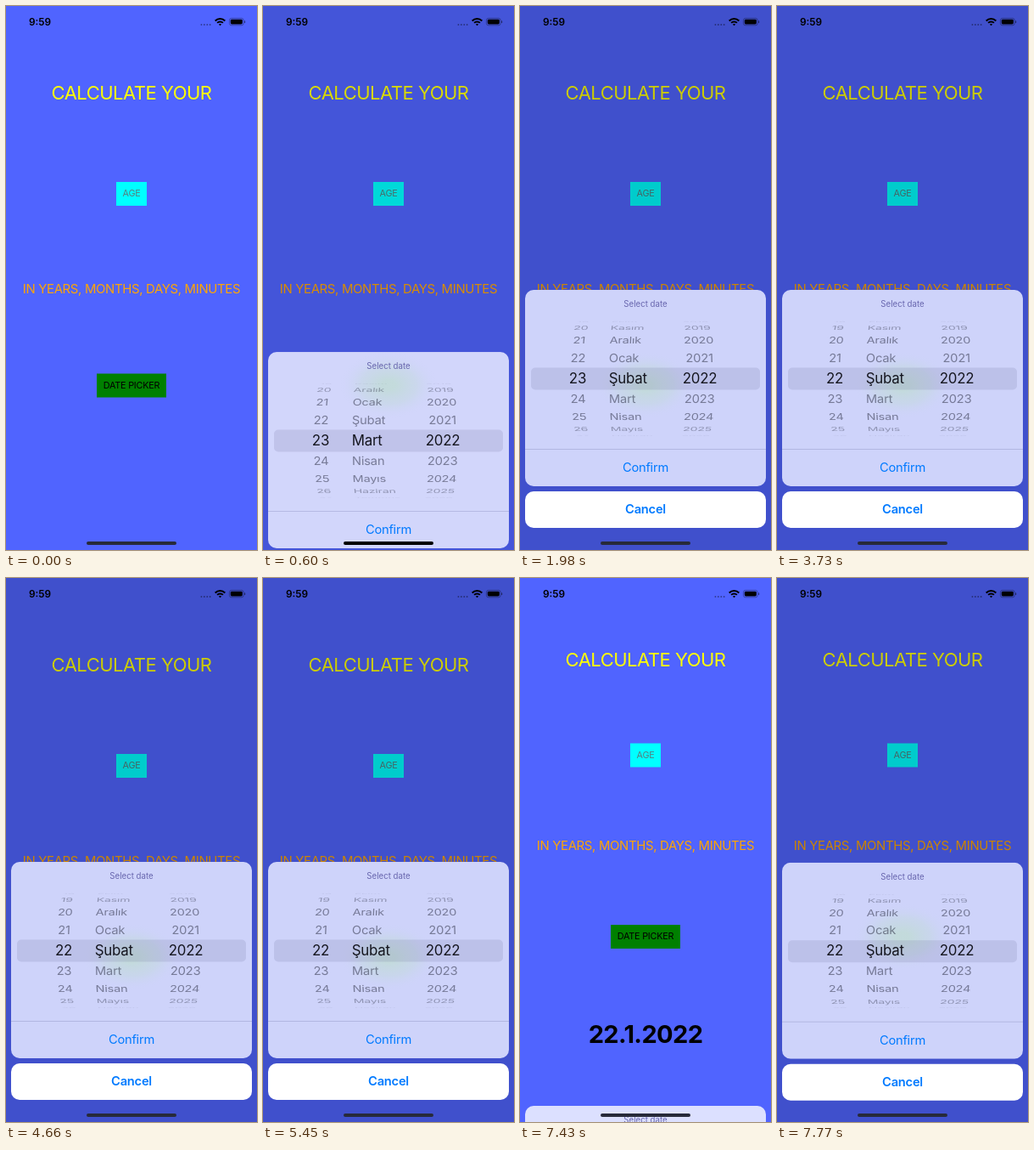
An HTML page with a canvas for the animation above (8000 ms loop, 296 by 640 pixels).

```html
<!DOCTYPE html>
<html lang="en">
<head>
<meta charset="utf-8">
<title>Age calculator</title>
<style>
html, body { margin: 0; width: 100%; height: 100%; overflow: hidden; background: #5064ff; }
canvas { display: block; width: 296px; height: 640px; }
</style>
</head>
<body>
<canvas id="stage"></canvas>
<script>
const W = 296, H = 640, LOOP = 8000, MID = W / 2;
const canvas = document.getElementById('stage');
const ctx = canvas.getContext('2d');
const dpr = window.devicePixelRatio || 1;
canvas.width = W * dpr;
canvas.height = H * dpr;

const FONT = 'Inter, Roboto, "Liberation Sans", sans-serif';
const BLUE = '#007aff';
const MONTHS = ['Ocak', 'Şubat', 'Mart', 'Nisan', 'Mayıs', 'Haziran', 'Temmuz',
  'Ağustos', 'Eylül', 'Ekim', 'Kasım', 'Aralık'];

// The screen refreshes in these moments only.
const TICKS = [0, 500, 600, 710, 820, 1530, 1640, 1750, 1860, 1980,
  2410, 2530, 2640, 2760, 2870, 3270, 3380, 3530, 3640, 3730,
  4080, 4350, 4470, 4660, 5340, 5450, 5570, 5680, 5790, 5890,
  7430, 7550, 7660, 7770];
const OPEN = 500, CLOSE = 5520, CHOSEN = 5570, REOPEN = 7430;

// Wheel geometry
const STEP = 21 * Math.PI / 180, RADIUS = 67, DEPTH = 0.085, ZOOM = 1.14;

const clamp = (v, a, b) => Math.min(b, Math.max(a, v));
const snap = t => TICKS.filter(k => k <= t).pop();
const settle = (t, tau) => Math.exp(-Math.pow(t / tau, 1.2));

function smooth(t, a, b) {
  const u = clamp((t - a) / (b - a), 0, 1);
  return u * u * (3 - 2 * u);
}

function bump(t, a, b, h) {
  return t > a && t < b ? h * Math.sin(Math.PI * (t - a) / (b - a)) : 0;
}

function text(str, x, y, size, color, spacing = 0, weight = 400, align = 'center') {
  ctx.font = `${weight} ${size}px ${FONT}`;
  ctx.letterSpacing = spacing + 'px';
  ctx.textAlign = align;
  ctx.textBaseline = 'middle';
  ctx.fillStyle = color;
  ctx.fillText(str, x, y);
}

function box(x, y, w, h, r, color) {
  ctx.beginPath();
  ctx.roundRect(x, y, w, h, r);
  ctx.fillStyle = color;
  ctx.fill();
}

function page(chosen) {
  const [title, age, line, pick] = chosen ? [97.5, 208.5, 315.5, 422] : [103.5, 221, 334, 446.5];
  text('CALCULATE YOUR', MID, title, 22, '#ff0', -0.5);
  box(130, age - 14, 36, 28, 0, '#0ff');
  text('AGE', MID, age, 10.8, '#557f7f', -0.22);
  text('IN YEARS, MONTHS, DAYS, MINUTES', MID, line, 14.9, '#ffa500', -0.33);
  box(107, pick - 14, 82, 28, 0, '#008000');
  text('DATE PICKER', MID, pick, 10.8, '#000', -0.22);
  if (chosen) text('22.1.2022', MID, 538.5, 29, '#000', -0.6, 700);
}

function statusBar() {
  text('9:59', 40, 19.2, 11.8, '#000', 0, 600);
  for (let i = 0; i < 4; i++) box(229.5 + i * 3.4, 21, 1.9, 1.9, 1, 'rgba(0,0,0,.4)');
  ctx.save();
  ctx.beginPath();
  ctx.moveTo(252.5, 23.3);
  ctx.arc(252.5, 23.3, 10, -Math.PI * 0.75, -Math.PI * 0.25);
  ctx.closePath();
  ctx.clip();
  ctx.strokeStyle = '#000';
  ctx.lineWidth = 2;
  for (const r of [1.2, 4.9, 8.2]) {
    ctx.beginPath();
    ctx.arc(252.5, 23.3, r, -Math.PI, 0);
    ctx.stroke();
  }
  ctx.restore();
  ctx.beginPath();
  ctx.roundRect(263.4, 14.4, 16.8, 8.4, 2.5);
  ctx.strokeStyle = 'rgba(0,0,0,.4)';
  ctx.lineWidth = 0.8;
  ctx.stroke();
  box(264.8, 15.8, 14, 5.6, 1.4, '#000');
  box(281, 17.2, 1.2, 2.8, 0.6, 'rgba(0,0,0,.45)');
}

function column(x, align, pos, label, cy, lens) {
  const base = Math.round(pos);
  for (let i = base - 5; i <= base + 5; i++) {
    const a = (i - pos) * STEP, c = Math.cos(a);
    if (c < 0.04 || Math.abs(a) > 1.55) continue;
    const p = 1 - DEPTH * (1 - c), dx = x - MID, z = lens ? ZOOM : 1;
    const lean = -dx * DEPTH * Math.tan(a) / RADIUS;
    ctx.save();
    ctx.translate(MID + dx * p, cy + RADIUS * Math.sin(a) * z);
    ctx.transform(p * z, 0, lean * c * z, c * z, 0, 0);
    const ink = lens ? '#15161f' : `rgba(20,22,40,${0.47 * Math.min(1, c * 1.6)})`;
    text(label(i), 0, 0, 14.8, ink, -0.2, 400, align);
    ctx.restore();
  }
}

function wheels(t, top) {
  const cy = top + 104.5, bandY = cy - 13;
  const day = 23 - smooth(t, 2350, 2870) + bump(t, 3200, 3730, 0.12);
  const month = 2 - smooth(t, 1470, 1980);
  const year = 2022 + bump(t, 4000, 4660, 0.2);
  box(13, bandY, 270, 26, 5, 'rgba(100,104,150,.17)');
  for (const lens of [false, true]) {
    ctx.save();
    ctx.beginPath();
    if (lens) ctx.rect(0, bandY, W, 26);
    else {
      ctx.rect(0, cy - 72, W, 59);
      ctx.rect(0, cy + 13, W, 59);
    }
    ctx.clip();
    column(68, 'center', day, i => String(i), cy, lens);
    column(104.7, 'left', month, i => MONTHS[(i + 12) % 12], cy, lens);
    column(212, 'center', year, i => String(i), cy, lens);
    ctx.restore();
  }
}

function glow(y) {
  ctx.save();
  ctx.translate(MID, y);
  ctx.scale(1, 0.68);
  const g = ctx.createRadialGradient(0, 0, 8, 0, 0, 58);
  g.addColorStop(0, 'rgba(192,220,212,.8)');
  g.addColorStop(0.5, 'rgba(195,217,222,.5)');
  g.addColorStop(1, 'rgba(205,211,250,0)');
  ctx.fillStyle = g;
  ctx.fillRect(-60, -60, 120, 120);
  ctx.restore();
}

function sheet(t, off, shade, chosen) {
  const top = 334 + off;
  const mix = (a, b) => Math.round(a + (b - a) * shade);
  ctx.save();
  ctx.beginPath();
  ctx.roundRect(6, top, 284, 231, 10);
  ctx.clip();
  ctx.fillStyle = `rgb(${mix(220, 206)},${mix(224, 211)},${mix(255, 250)})`;
  ctx.fillRect(6, top, 284, 231);
  glow(chosen ? 422 : 446);
  if (t >= 5340 && t < 5450) {
    ctx.fillStyle = 'rgba(235,235,235,.5)';
    ctx.fillRect(6, top + 188, 284, 43);
  }
  text('Select date', MID, top + 17, 9.7, '#6866ae');
  wheels(t, top);
  ctx.fillStyle = 'rgba(90,95,150,.3)';
  ctx.fillRect(6, top + 187, 284, 0.8);
  text('Confirm', MID, top + 210, 14.7, BLUE, -0.25);
  ctx.restore();
  box(6, top + 237, 284, 43, 10, '#fff');
  text('Cancel', MID, top + 259, 14.7, BLUE, -0.25, 600);
}

function offset(t) {
  if (t < OPEN) return 310;
  if (t < CLOSE) return 287 * settle(t - OPEN, 77);
  if (t < REOPEN) return 310 * (1 - settle(t - CLOSE, 105));
  return 287 * settle(t - REOPEN, 77);
}

function draw(t) {
  const off = offset(t);
  const shade = clamp(1 - off / 287, 0, 1);
  const chosen = t >= CHOSEN;
  ctx.setTransform(dpr, 0, 0, dpr, 0, 0);
  ctx.fillStyle = '#5064ff';
  ctx.fillRect(0, 0, W, H);
  page(chosen);
  ctx.fillStyle = `rgba(0,0,0,${0.2 * shade})`;
  ctx.fillRect(0, 0, W, H);
  if (off < 306) sheet(t, off, shade, chosen);
  statusBar();
  box(95, 630, 106, 4, 2, off > 5 && off < 200 ? '#000' : '#272a3a');
}

function frame(now) {
  draw(snap(now % LOOP));
  requestAnimationFrame(frame);
}
draw(0);
requestAnimationFrame(frame);
</script>
</body>
</html>
```
